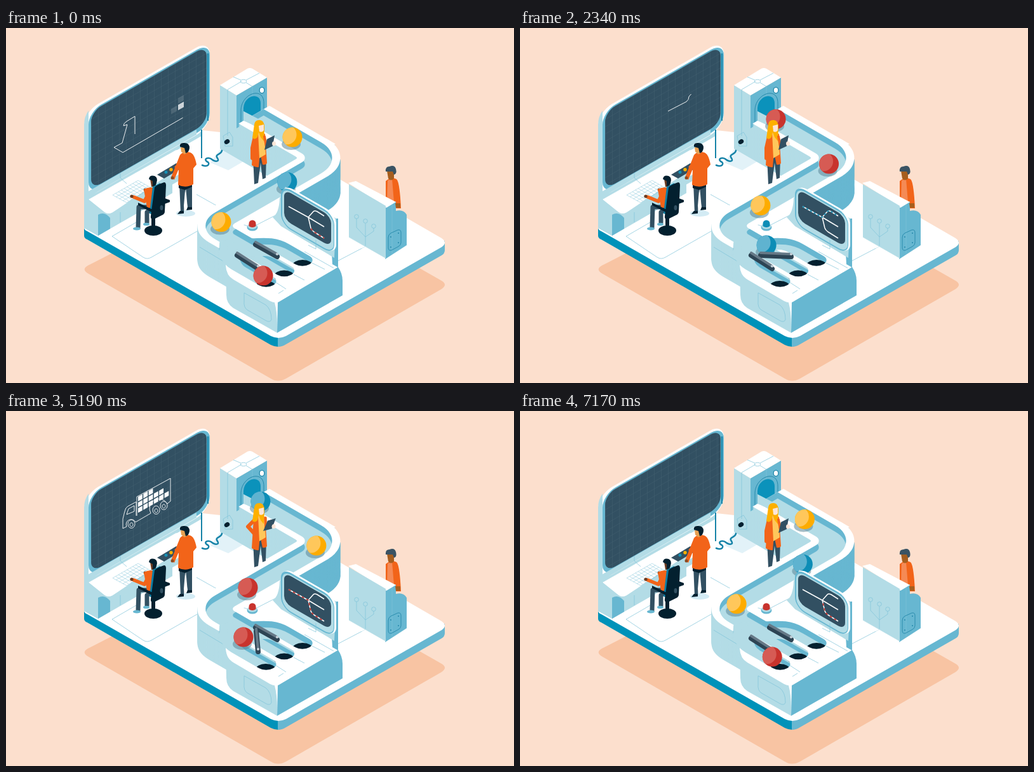
Recreate the animation shown at these times as an HTML page. Size 800 by 559 pixels, loop 7.2 s.

```html
<!DOCTYPE html>
<html lang="en">
<head>
<meta charset="utf-8">
<title>Sorting machine</title>
<style>
html,body{margin:0;width:100%;height:100%;overflow:hidden;background:#fcdfcd}
svg{display:block;width:800px;height:559px}
.iso{transform:matrix(.866,.5,-.866,.5,0,0)}
.n{fill:none}
.thin{fill:none;stroke:#7fc3d8;stroke-width:.7}
.ink{fill:none;stroke:#fff;stroke-width:.9;stroke-linejoin:round}
.bold{stroke-width:1.5}
.p{fill:#b3dce6}.b{fill:#67b7d1}.w{fill:#fff}.d{fill:#325062}.k{fill:#03202f}.o{fill:#f26419}
.limb{fill:none;stroke-linecap:round;stroke-linejoin:round}
</style>
</head>
<body>
<svg viewBox="0 0 800 559">
<defs>
  <pattern id="grid" width="11" height="11.5" patternUnits="userSpaceOnUse"><path d="M0 0V11.5M0 0H11" stroke="#466373" stroke-width=".8"/></pattern>
  <g id="legA"><path class="n" d="M362-89H482"/></g>
  <g id="legB"><path class="n" d="M489-79.600A32 32 0 0 1 498-57V70"/></g>
  <g id="legC"><path class="n" d="M498 40V100A25 25 0 0 0 523 125H566"/></g>
  <g id="lane" class="n">
    <path stroke-width="35" d="M362-89H466A32 32 0 0 1 498-57V100A25 25 0 0 0 523 125H566"/>
    <g stroke-width="26" stroke-linecap="round">
      <path d="M545 129H635"/><path d="M536 128Q562 162 585 162H635"/><path d="M546 126C572 122 568 96 598 96H635"/>
    </g>
  </g>
  <mask id="laneMask" maskUnits="userSpaceOnUse" x="0" y="0" width="800" height="559"><g class="iso" stroke="#fff"><use href="#lane"/></g></mask>
  <clipPath id="tunnel"><path d="M374 150V126C375 104 402 96 402 118V80H800V559H374Z"/></clipPath>
  <clipPath id="ballClip"><circle r="15.500"/></clipPath>
</defs>

<!-- platform -->
<path fill="#f8c4a3" d="M133 372Q116 379 130 387L417 552Q428 559 441 552L686 411Q696 404 686 398L400 235Z"/>
<path fill="#0092b9" d="M123 312V327Q123 331 128 333L417 499Q423 502 429 502V480Z"/>
<path class="b" d="M428 480V502Q435 502 441 498L686 358Q691 355 691 350V335Z"/>
<path class="w" d="M123 314Q123 318 128 320L417 485Q429 491 441 485L686 345Q696 338 686 331L411 172 300 160 123 290Z"/>
<path fill="#e2f2f8" d="M322 212L338 190 374 210 350 224Z"/>
<path class="thin" d="M167 328L216 361Q222 365 229 361L301 320M167 328L205 306M300 262L332 280M522 367L566 344V336"/>

<!-- wall screen and desk -->
<path class="p" d="M123 250V315L145 327 262 260V180Z"/>
<path class="p" d="M130 240V272L308 170V150Z"/>
<g transform="translate(123 132) skewY(-29.800)"><rect class="w" width="198" height="138" rx="22"/></g>
<path class="p" d="M123 152Q123 140 130 130V275L123 270Z"/>
<g transform="translate(130 132) skewY(-29.800)"><rect class="b" width="191" height="131" rx="20"/></g>
<g transform="translate(134 132) skewY(-29.800)"><rect class="d" width="182" height="122" rx="16"/><rect fill="url(#grid)" width="182" height="122" rx="16"/></g>
<path class="n" stroke="#1683a8" stroke-width="2" d="M318 40V146M308 160V205"/>
<path class="p" d="M130 266V257L300 160V168Z"/>
<path class="w" d="M130 270L268 192 292 207 167 291Q160 294 155 290Z"/>
<path class="p" d="M130 270L155 290Q160 294 167 291L275 229V239L164 303V316L145 327 130 318Z"/>
<path class="b" d="M145 294Q155 288 164 299V316L145 327Z"/>
<path class="thin" d="M180 228V236L190 245M180 290V306"/>
<g id="keys" class="thin" opacity=".7"><path d="M168 263L208 240 229 252 190 275Z"/></g>
<path class="d" d="M238 231L268 213 279 219 249 237Z"/>
<circle cx="252" cy="227" r="2.500" fill="#1690b5"/><circle cx="260" cy="223" r="2.700" fill="#fdb000"/><circle cx="268" cy="219" r="2.500" class="o"/>
<path class="limb" stroke="#1683a8" stroke-width="2.500" d="M309 216C318 220 323 213 316 210C311 206 318 203 323 206C330 212 337 210 333 205C328 198 339 200 340 193L345 182"/>

<!-- drawings on the wall screen -->
<g id="ship">
  <path class="ink line" pathLength="1" d="M203 167V139L190 147Q185 150 185 154L191 152 183 181 170 188 184 196 279 141 286 121 203 168"/>
  <g class="boxes"></g><path class="ink note" pathLength="1" d="M221 140L231 114 256 101"/>
</g>
<g id="plane">
  <path class="ink line" pathLength="1" d="M233 131L262 116Q266 113 266 108L274 99V131L265 128 233 145V179Q232 184 228 183L214 160Q197 170 188 169Q183 168 192 158L215 143 229 101Q231 96 234 98V131"/>
  <path class="fillbar" fill="#0b8fb8" d="M201 153L267 118Q270 121 265 126L201 162Z"/>
  <path class="ink note" pathLength="1" d="M236 130L242 108 256 100"/>
</g>
<g id="truck">
  <path class="ink line" pathLength="1" d="M205 165V143L192 150Q188 152 187 158L184 170V185L190 182A7 7 0 0 1 204 175L228 161A8 8 0 0 1 254 146L259 142V106L206 135V165M190 163L193 154 202 149V158ZM203 178A5.500 6.500 0 1 1 203 177.900M242 156A5.500 6.500 0 1 1 242 155.900M254 149A5.500 6.500 0 1 1 254 148.900M200 179A2.500 3 0 1 1 200 178.900M239 157A2.500 3 0 1 1 239 156.900M251 150A2.500 3 0 1 1 251 149.900"/>
  <g class="boxes"></g><path class="ink note" pathLength="1" d="M222 133L231 116 258 106"/>
  <path id="alert" class="n" stroke="#d8392f" stroke-width="1.400" d="M231 110L236 97 241 104ZM236 101V104M236 106V107"/>
</g>
<g id="memo" stroke="#fff" stroke-width="1.700"></g>

<!-- standing operator -->
<ellipse cx="283" cy="292" rx="15" ry="5" fill="#d3ebf4"/>
<path class="d" d="M273 244L275 291H280L283 250 286 284H293L293 244Z"/>
<path class="w" d="M282 256L286 284 281 288 280 280Z"/>
<path class="k" d="M272 246V252L282 255 293 250V242H272ZM274 288H280V292L270 293ZM286 282H293V286L284 287Z"/>
<path class="o" d="M274 200Q280 193 290 196Q297 198 300 215L295 221V246Q283 253 271 247L272 222 265 239 260 235Z"/>
<path fill="#e6a052" d="M275 188H286V196Q280 201 279 197L276 195Z"/>
<path class="k" d="M274 187Q273 180 281 181Q289 181 289 189Q288 196 283 197L281 189Z"/>
<circle cx="262" cy="236" r="2.500" fill="#8a4b24"/>

<!-- seated operator -->
<ellipse class="k" cx="232" cy="319" rx="14" ry="8"/><path class="k" d="M229 298H235V318H229Z"/>
<path class="limb" stroke="#325062" stroke-width="7" d="M230 282L209 282 208 314M228 286L222 290V306"/>
<ellipse cx="206" cy="316" rx="6" ry="2.500" class="b"/><ellipse cx="221" cy="309" rx="5" ry="2.300" class="b"/>
<path id="armFar" class="limb" stroke="#f26419" stroke-width="5"/><circle id="handFar" r="2.400" fill="#6b3c22"/>
<path class="o" d="M217 254Q226 249 234 252V283H222Z"/>
<path id="armNear" class="limb" stroke="#f26419" stroke-width="5.500"/><circle id="handNear" r="2.600" fill="#6b3c22"/>
<path fill="#6b3c22" d="M227 238H236V250H229Z"/>
<path class="k" d="M225 238Q226 231 234 233Q240 236 237 244Q236 249 231 249L231 241Z"/>
<path fill="#0b7ea6" d="M231 250L243 244 236 296 226 292Z"/>
<path class="k" d="M234 251Q237 247 249 243Q252 243 252 248L250 289Q250 293 245 295L233 301Q227 302 228 296ZM208 275L233 287V292L208 279ZM247 267L258 271V274L247 278Z"/>
<ellipse cx="245" cy="283" rx="2.500" ry="4" class="d"/>

<!-- tower -->
<path class="p" d="M337 90L363 106V150L420 185V238L337 190Z"/>
<path class="b" d="M363 106L411 78V130L363 158Z"/>
<path class="w" d="M337 90L380 64Q384 62 388 64L411 78 363 106Z"/>
<path class="thin" d="M349 97V170M349 97L371 84M378 82L399 71M358 77L370 82M378 86L388 92V107M342 170L352 164 357 172V186L345 186Z"/>
<ellipse class="thin" cx="374" cy="84" rx="4.500" ry="2.800"/>
<ellipse cx="403" cy="98" rx="4.500" ry="5.300" fill="#2588aa"/><ellipse cx="403" cy="98" rx="3.200" ry="4" class="w"/>
<path class="n" stroke="#2588aa" d="M370 149V128C372 102 406 92 406 118V128"/>
<path fill="#0b92bb" d="M374 148V126C375 106 400 100 401 118V132Z"/>
<ellipse class="k" cx="348" cy="179" rx="4.500" ry="3.500" transform="rotate(-35 348 179)"/>

<!-- track -->
<g id="walls" stroke-width="56"></g>
<path class="b" d="M428 432L522 375Q530 386 530 398V421L427 480Z"/>
<path class="p" d="M346 364Q349 380 362 388L416 420Q428 430 427 480L358 441Q347 434 347 420Z"/>
<path class="w" d="M354 295L430 250 522 322V377L430 431Q424 434 416 430L358 396Q347 390 346 374V350L330 330Z"/>
<path class="thin" d="M375 417L409 436Q418 443 418 459Q416 465 408 460L380 444Q374 440 375 430ZM305 345L345 369M429 418L437 413M424 400L441 411M453 388L470 397M482 370L502 380M470 352L516 378M370 306L378 298M366 305Q385 317 393 311L432 291"/>
<g class="iso n" stroke="#fff" stroke-width="56"><use href="#legA"/><use href="#legC"/><path d="M466-89A32 32 0 0 1 498-57V92"/></g>
<g mask="url(#laneMask)">
  <path class="b" d="M0 0H800V559H0Z"/>
  <g transform="translate(0 10)"><g class="iso" stroke="#b3dce6"><use href="#lane"/></g></g>
  <g class="k"><ellipse cx="409" cy="407" rx="16" ry="9"/><ellipse cx="438" cy="390.500" rx="16" ry="9"/><ellipse cx="467" cy="374" rx="16" ry="9"/></g>
</g>
<path class="p" d="M374 131L403 146 388 152 374 146Z"/>
<g id="low"></g>
<g id="flippers" class="limb"></g>
<g id="high"></g>
<ellipse class="b" cx="388" cy="314" rx="8.500" ry="5.500"/><ellipse class="p" cx="388" cy="312" rx="7.500" ry="4.500"/>
<path id="lamp" d="M382.500 308A5.500 5.500 0 0 1 393.500 308V312Q388 316 382.500 312Z"/>

<!-- route panel -->
<path class="p" d="M433 264V312L420 298Q430 292 431 268Z"/>
<path class="b" d="M510 300L523 300V377L514 372Z"/>
<path class="p" d="M433 262V312L517 362 520 300 440 250Z"/>
<g transform="translate(433 246) skewY(30)"><rect x="3" y="-3" width="84" height="64" rx="16" class="w"/><rect width="84" height="63" rx="16" class="b"/><rect y="3" x="2" width="81" height="58" rx="14" class="p"/><rect x="5" y="5" width="74" height="48" rx="11" class="d"/></g>
<path class="thin" d="M488 334V348L476 342"/>
<path class="ink bold" d="M445 281L476 298L484 289Q486 287 490 289L501 296M476 298L501 313M476 298L480 315Q481 318 485 321L501 331"/>
<path id="route" class="n" pathLength="100" stroke-width="1.700"/>

<!-- woman -->
<g id="woman">
  <path class="d" d="M389 203L391 246 397 244 401 212 404 238 409 236 410 203Z"/>
  <path class="o" d="M390 168Q400 161 408 167L411 213Q409 216 404 215L400 196 398 219Q392 220 387 216Z"/>
  <path fill="#ffc75b" d="M397 165H406L409 199 399 205Z"/>
  <path id="hip" class="limb" stroke="#f26419" stroke-width="6"/>
  <path fill="#fdb000" d="M391 152Q392 144 400 145Q407 146 407 156L406 178 401 172 398 164 396 172Q392 177 388 173Z"/>
  <path fill="#fde6d8" d="M398 154L406 152V161Q404 165 399 163Z"/>
  <g id="tablet"><path class="limb" stroke="#f26419" stroke-width="4" d="M407 171L410 186"/><path class="d" d="M407 192L411 175 423 169 420 186Z"/><ellipse cx="422" cy="182" rx="3" ry="3.500" fill="#fde6d8"/></g>
</g>

<!-- observer and cabinet -->
<path class="o" d="M598 241Q606 234 615 238Q620 242 622 284H598Z"/><path fill="#f58a55" d="M601 240L608 238 611 274H600Z"/>
<path fill="#a65e1e" d="M600 225H611V237Q606 242 602 237Z"/>
<path fill="#3a5363" d="M598 226Q597 218 604 218Q612 215 614 222Q616 230 611 231L609 226Z"/>
<path class="b" d="M597 282L614 273V288Q626 285 631 294V342L597 364Z"/>
<path fill="#a65e1e" d="M613 276H621V283H614Z"/>
<path class="w" d="M539 244L551 241 614 274 599 283Z"/>
<path class="p" d="M540 246L598 280V363L540 330Z"/>
<path class="w" d="M536 327L597 362 592 365 534 332Z" opacity=".6"/>
<g class="thin"><circle cx="552" cy="297" r="3.300"/><circle cx="566" cy="304" r="3.300"/><circle cx="579" cy="312" r="3.300"/><path d="M552 300V314L566 329 579 320V315M566 308V343M608 278V355"/></g>
<path class="n" stroke="#2588aa" stroke-width=".9" d="M602 330Q602 325 606 323L617 318Q622 317 622 322V338Q622 342 618 344L607 350Q602 351 602 346Z"/>
<g fill="#2588aa"><circle cx="606" cy="329" r="1"/><circle cx="618" cy="323" r="1"/><circle cx="606" cy="345" r="1"/><circle cx="618" cy="338" r="1"/></g>
</svg>
<script>
const $ = q => document.querySelector(q), LOOP = 7200;
const clamp = v => Math.max(0, Math.min(1, v));
const ramp = (t, a, b) => clamp((t - a) / (b - a));
const ease = v => v * v * (3 - 2 * v);
const pulse = (t, a, b, c, d) => ease(ramp(t, a, b)) * (1 - ease(ramp(t, c, d)));
const add = (parent, html) => {
  parent.insertAdjacentHTML('beforeend', html);
  return parent.lastElementChild;
};

// Extruded track walls
let walls = '';
for (const [id, color] of [['legA', '#b3dce6'], ['legB', '#67b7d1'], ['legC', '#b3dce6']])
  for (let y = 54; y > 0; y -= 2)
    walls += `<g transform="translate(0 ${y})"><use class="iso" href="#${id}" stroke="${color}"/></g>`;
$('#walls').innerHTML = walls;

for (let i = 1; i < 9; i++) add($('#keys'), `<path d="M${168 + i * 4.5} ${263 - i * 2.6}l21 12"/>`);
for (let i = 1; i < 4; i++) add($('#keys'), `<path d="M${168 + i * 5.3} ${263 + i * 3}l40-23"/>`);

// Cargo on the wall screen
const stack = (id, x, y, dx, dy, w, h, heights) => {
  const list = [];
  heights.forEach((n, c) => {
    for (let r = 0; r < n; r++) {
      const el = add($(id + ' .boxes'),
        `<path fill="#fff" d="M${x + c * dx} ${y - c * dx * .56 - r * dy}l${w} ${-w * .56}v${h}l${-w} ${w * .56}z"/>`);
      list.push({ el, c, r });
    }
  });
  return list;
};
const cargo = stack('#ship', 205, 158, 11, 10.500, 9, 8.500, [3, 3, 3, 3, 3, 3, 2]);
const crates = stack('#truck', 208, 153, 8.300, 9, 6.800, 7.300, [3, 3, 3, 2, 2, 1]);
const memo = [13, 13, 9, 13, 8].map((w, i) =>
  add($('#memo'), `<path pathLength="1" d="M244 ${93.5 + i * 3}l${w} ${-w * .56}"/>`));

// Balls: local time, x, y
const common = [[-2700, 350, 113], [-2190, 388, 135], [-1980, 403, 143.500], [-1440, 451, 172], [-1080, 477, 187],
  [-900, 488, 194], [-750, 492, 202], [-570, 489, 212], [-330, 470, 228], [0, 443, 242.500], [900, 379, 279.500],
  [1200, 357, 292], [1440, 339, 305.500], [1560, 335, 313], [1680, 340, 321], [1800, 350, 327], [2130, 378, 342]];
const routes = {
  left: { keys: [[2310, 374, 356], [2460, 373, 366], [2850, 397, 387], [2880, 405, 390], [2950, 410, 396], [3130, 410, 428]],
    hole: [409, 398.500], drop: 2890, line: 'L480 315Q481 318 485 321L501 331' },
  mid: { keys: [[2550, 421, 368], [2640, 434, 374], [2690, 438, 379], [2870, 438, 410]],
    hole: [438, 382], drop: 2670, line: 'L501 313' },
  right: { keys: [[2340, 388, 342], [2490, 410, 337], [2600, 433, 340], [2790, 463, 356], [2840, 467, 361], [3020, 467, 394]],
    hole: [467, 365.500], drop: 2800, line: 'L484 289Q486 287 490 289L501 296' }
};
for (const name in routes) {
  const [x, y] = routes[name].hole;
  add($('defs'), `<clipPath id="${name}"><path d="M0 0H800V${y}H${x + 16}A16 9.200 0 0 1 ${x - 16} ${y}H0Z"/></clipPath>`);
}
const red = ['#c8332d', '#d65b54'], yellow = ['#fdac00', '#ffc75b'], blue = ['#0d8db6', '#5fb3d0'];
const balls = [[yellow, 'mid'], [blue, 'right'], [yellow, 'mid'], [red, 'left'], [red, 'left']].map(([color, route], i) => {
  const el = add($('#low'), `<g><g><ellipse cx="-2" cy="11" rx="15" ry="9" fill="#5b8798"/>
    <circle r="15.500" fill="${color[0]}"/><circle cx="-9" cy="-4" r="15.500" fill="${color[1]}" clip-path="url(#ballClip)"/></g></g>`);
  return { el, color: color[0], route, start: (i - 1) * 1440, keys: [...common, ...routes[route].keys] };
});
const at = (keys, s) => {
  let i = 1;
  while (i < keys.length - 1 && keys[i][0] < s) i++;
  const [a, x, y] = keys[i - 1], [b, u, v] = keys[i], k = ramp(s, a, b);
  return [x + (u - x) * k, y + (v - y) * k];
};

const flipper = (px, py, a, b) => {
  const el = add($('#flippers'), `<g><path stroke="#2d4454" stroke-width="8"/><path stroke="#667987" stroke-width="4"/>
    <circle cx="${px}" cy="${py - 2}" r="2" fill="#c7d3da"/></g>`);
  return k => {
    const x = a[0] + (b[0] - a[0]) * k, y = a[1] + (b[1] - a[1]) * k;
    [2, -2].forEach((dy, i) => el.children[i].setAttribute('d', `M${x} ${y + dy}L${px} ${py + dy}`));
  };
};
const upper = flipper(427, 358, [393, 339], [379, 356]);
const lower = flipper(397, 377, [364, 356], [394, 345]);

const trace = (el, k) => {
  el.style.strokeDasharray = `${k} 2`;
  el.style.opacity = k > .001 ? 1 : 0;
};
const set = (id, name, value) => $(id).setAttribute(name, value);

function drawBalls(t) {
  let swingUp = 0, swingLow = 0;
  for (const b of balls) {
    const s = ((t - b.start + 2700) % LOOP + LOOP) % LOOP - 2700, [x, y] = at(b.keys, s), r = routes[b.route];
    const layer = s > 2400 ? $('#high') : $('#low');
    if (b.el.parentNode !== layer) layer.append(b.el);
    b.el.style.display = s > 3150 ? 'none' : '';
    b.el.firstChild.setAttribute('transform', `translate(${x} ${y})`);
    b.el.firstChild.firstElementChild.style.opacity = s > 2500 ? 0 : .55;
    b.el.setAttribute('clip-path', s < -1600 ? 'url(#tunnel)' : s > r.drop ? `url(#${b.route})` : 'none');
    const swing = pulse(s, 1750, 1950, 2480, 2700);
    if (b.route === 'right') swingUp += swing;
    if (b.route === 'left') swingLow += swing;
    if (s >= 1600 && s < 3040) {
      set('#lamp', 'fill', b.color);
      const head = 100 * ramp(s, 1650, 1950), tail = 100 * ramp(s, 2760, 2940);
      let dash = `0 ${tail}`;
      for (let p = tail; p < head; p += 10) dash += ` ${Math.min(5, head - p)} 5`;
      set('#route', 'd', 'M445 281L476 298' + r.line);
      set('#route', 'stroke', b.color);
      set('#route', 'stroke-dasharray', dash + ' 0 200');
    }
  }
  upper(swingUp);
  lower(swingLow);
}

function drawScreen(t) {
  const shipOut = 1 - ramp(t, 1780, 2150);
  trace($('#ship .line'), Math.min(.66 + .34 * ramp(t, 0, 270), shipOut));
  cargo.forEach(({ el, c, r }) => {
    const d = (6 - c + r) * 75 - 90;
    el.style.opacity = ramp(t, d, d + 120) * (1 - ramp(t, 1750, 1950));
    el.setAttribute('fill', c === 1 && r === 1 && t > 750 ? '#fdb000' : '#fff');
  });
  trace($('#ship .note'), ramp(t, 600, 750) * (1 - ramp(t, 1700, 1850)));

  trace($('#plane .line'), ramp(t, 2250, 2930) * (1 - ramp(t, 4200, 4480)));
  const bar = ramp(t, 3030, 3330) * (1 - ramp(t, 4120, 4300));
  $('.fillbar').style.clipPath = `inset(0 ${100 - bar * 100}% 0 0)`;
  trace($('#plane .note'), ramp(t, 3250, 3400) * (1 - ramp(t, 4080, 4230)));

  trace($('#truck .line'), ramp(t, 4540, 5020) * (1 - ramp(t, 6840, 7130)));
  crates.forEach(({ el, c, r }) => {
    const d = 4780 + (c + r) * 45;
    el.style.opacity = ramp(t, d, d + 80) * (1 - ramp(t, 6800, 7000));
    el.setAttribute('fill', r === 0 && c < 2 && t > 5400 ? '#d8392f' : '#fff');
  });
  trace($('#truck .note'), ramp(t, 5420, 5570) * (1 - ramp(t, 6780, 6930)));
  $('#alert').style.opacity = t > 5600 && t < 6850 && (t - 5650) % 500 < 350 ? 1 : 0;

  memo.forEach((el, i) => {
    const k = [[700, 1700], [3350, 4080], [5550, 6790]].reduce((sum, [a, b]) =>
      sum + ramp(t, a + i * 50, a + i * 50 + 120) * (1 - ramp(t, b, b + 150)), 0);
    trace(el, k);
  });
}

function drawPeople(t) {
  const hip = pulse(t, 3250, 3550, 6700, 7000), lift = pulse(t, 3250, 3550, 5900, 6200);
  set('#hip', 'd', `M392 171L${388 - 7 * hip} ${189 - 7 * hip}L${388 + 3 * hip} ${205 - 12 * hip}`);
  set('#tablet', 'transform', `rotate(${10 * lift} 407 172) translate(${lift} ${-3 * lift})`);
  const tap = pulse(t, 800, 950, 2050, 2250) * (.75 + .25 * Math.cos((t - 1200) / 70));
  const far = pulse(t, 3100, 3300, 4300, 4500);
  const nx = 198 - 5 * tap, ny = 265 - 3 * tap, fx = 219 - 10 * far, fy = 255 - 4 * far;
  set('#armNear', 'd', `M225 259L218 273L${nx + 3} ${ny + 1}`);
  set('#handNear', 'cx', nx); set('#handNear', 'cy', ny);
  set('#armFar', 'd', `M229 257L224 261L${fx + 2} ${fy + 1}`);
  set('#handFar', 'cx', fx); set('#handFar', 'cy', fy);
}

function frame() {
  const t = performance.now() % LOOP;
  drawBalls(t);
  drawScreen(t);
  drawPeople(t);
  requestAnimationFrame(frame);
}
frame();
</script>
</body>
</html>
```
